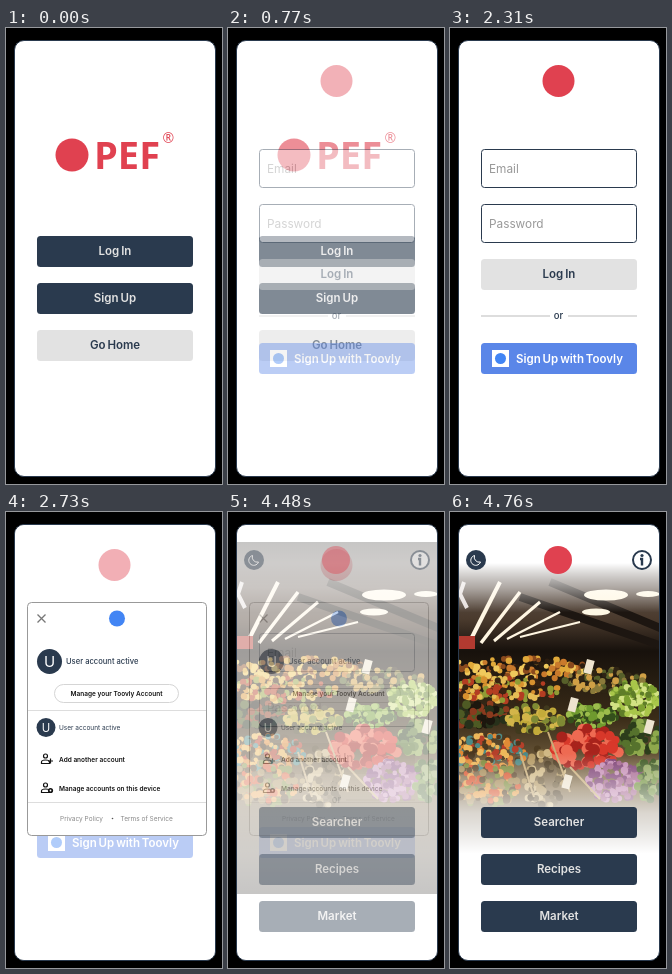
Recreate the animation shown at these times as an HTML page. Size 216 by 456 pixels, loop 6.09 s.

```html
<!DOCTYPE html>
<html lang="en">
<head>
<meta charset="utf-8">
<title>App login flow</title>
<style>
  html, body { margin: 0; width: 100%; height: 100%; overflow: hidden; background: #000; }
  svg { display: block; width: 216px; height: 456px; font-family: Inter, sans-serif; }
  /* Screens dissolve element by element; the dialog fades as a whole. */
  #welcome > * { opacity: var(--welcome); }
  #login > * { opacity: var(--login); }
  #home > * { opacity: var(--home); }
  #dialog { opacity: var(--dialog); }
  .label { font-size: 11.5px; font-weight: 600; word-spacing: -1px; }
  .hint { font-size: 11.8px; fill: #999; }
  .small { font-size: 6.5px; }
  .bold { font-weight: 600; fill: #111; }
  .mid { text-anchor: middle; }
</style>
</head>
<body>
<svg viewBox="0 0 216 456">
  <defs>
    <clipPath id="card"><rect x="9" y="13" width="200" height="435" rx="9"/></clipPath>
    <clipPath id="frame"><rect x="9" y="30" width="200" height="352"/></clipPath>
    <linearGradient id="depth" x1="0" y1="0" x2="0" y2="1">
      <stop offset="0" stop-color="#17130f"/>
      <stop offset=".13" stop-color="#5d5046"/>
      <stop offset=".22" stop-color="#4a3a2d"/>
      <stop offset=".31" stop-color="#17110c"/>
      <stop offset=".5" stop-color="#3a2c18"/>
      <stop offset=".7" stop-color="#8a7450"/>
      <stop offset="1" stop-color="#17130f"/>
    </linearGradient>
    <linearGradient id="haze" x1="0" y1="0" x2="0" y2="1">
      <stop offset=".06" stop-color="#fff"/>
      <stop offset=".2" stop-color="#fff" stop-opacity="0"/>
      <stop offset=".6" stop-color="#fff" stop-opacity="0"/>
      <stop offset=".77" stop-color="#fff" stop-opacity=".75"/>
      <stop offset=".885" stop-color="#fff"/>
    </linearGradient>
    <filter id="soft"><feGaussianBlur stdDeviation=".6"/></filter>
  </defs>
  <rect x="8.5" y="12.5" width="201" height="436" rx="9.5" fill="#fff" stroke="#2a3a4e"/>
  <g clip-path="url(#card)">
    <g id="welcome"></g>
    <g id="login"></g>
    <g id="dialog"></g>
    <g id="home"></g>
  </g>
</svg>
<script>
const NAVY = '#2a3a4e', RED = '#e04150', BLUE = '#4285f4', GREY = '#e2e2e2';
const LOOP = 6090, STEP = 70, STEPS = 6;
const $ = id => document.getElementById(id);

const circle = (x, y, r, fill) => `<circle cx="${x}" cy="${y}" r="${r}" fill="${fill}"/>`;
const text = (x, y, str, cls, fill = NAVY) =>
  `<text x="${x}" y="${y}" class="${cls}" fill="${fill}">${str}</text>`;
const button = (y, label, fill = NAVY, color = GREY) =>
  `<g><rect x="31" y="${y}" width="156" height="31" rx="3.5" fill="${fill}"/>${text(109, y + 19, label, 'label mid', color)}</g>`;
const field = (y, label) =>
  `<g><rect x="31.5" y="${y}" width="155" height="38" rx="3" fill="#fff" stroke="${NAVY}"/>${text(39, y + 23, label, 'hint')}</g>`;
const line = (d, color, width = 1) =>
  `<path d="${d}" fill="none" stroke="${color}" stroke-width="${width}"/>`;
const avatar = (x, y, r) =>
  circle(x, y, r, NAVY) + `<text x="${x}" y="${y + r * .43}" class="mid" font-size="${r * 1.2}" fill="#fff">U</text>`;
const person = y => line(`M35.5 ${y + 4.5}v-1.5q0-2 4-2t4 2v1.5zM37.5 ${y - 3}a2 2 0 1 0 4 0a2 2 0 1 0-4 0`, '#111', 1.2);

// Market stall: heaps of small round shapes in soft focus.
let seed = 11;
const random = () => (seed = seed * 16807 % 2147483647) / 2147483647;
function heap([x, y, w, h, colors, count, size]) {
  const list = colors.split(' ');
  let out = '';
  for (let i = 0; i < count; i++) {
    const angle = random() * 2 * Math.PI, d = Math.sqrt(random());
    out += circle((x + w * d * Math.cos(angle)).toFixed(1), (y + h * d * Math.sin(angle)).toFixed(1),
      (size * (.7 + .5 * random())).toFixed(1), list[i % list.length]);
  }
  return out;
}
const heaps = [
  [65, 157, 75, 11, '#e0a93a #f0c95c #8a4a1e #2a1c10 #c97a2c', 130, 3],
  [55, 178, 55, 12, '#d8922f #3a2412 #e6bd55 #8f9b35 #b33d22', 130, 3],
  [155, 168, 40, 12, '#8a7a3a #2e2414 #d0a046 #57602a', 90, 3],
  [30, 203, 30, 12, '#1c170e #4e5a24 #27301a #8a3a1e', 70, 4],
  [85, 207, 28, 14, '#d3b54a #7f8a34 #40391d #c3ab3a', 80, 3.5],
  [38, 240, 40, 18, '#e08a35 #4d8a86 #b5402a #4a3820 #edb85a', 140, 3],
  [35, 272, 35, 22, '#d8532b #a58a55 #7d8a3a #e8a04a #5a4428', 130, 3.5],
  [95, 265, 24, 30, '#b59a64 #6d5a38 #d0b884 #4e3d22', 80, 3.5],
  [142, 203, 24, 12, '#6f9a2f #35501c #9cbc4c', 80, 3],
  [185, 187, 24, 18, '#a9c64a #7da030 #d2e283 #5f7d28', 140, 3],
  [190, 226, 22, 16, '#56722d #8ea84c #2c3d1b', 70, 4],
  [137, 236, 33, 20, '#d8382a #a8231c #ee6a52', 80, 5],
  [165, 269, 27, 20, '#a5658f #7d4174 #c48cb4', 120, 3.2],
  [200, 266, 14, 22, '#6f8f3a #3f5a24 #93a860', 60, 3.5]
];
const lamp = (x, y, w) => `<ellipse cx="${x}" cy="${y}" rx="${w}" ry="${w / 4}" fill="#fff8e4"/>`;
const tag = (x, y) =>
  `<rect x="${x}" y="${y}" width="8" height="14" fill="#eee4cf" transform="rotate(15 ${x} ${y})"/>`;
// Strip lights and ceiling beams fan out from the far end of the hall.
const beams = [0, 1, 2, 3, 4].map(i =>
  line(`M${18 + i * 13} ${133 - i * 2}L${50 + i * 20} ${70 + i * 10}`, '#fff6e2', 4 - i * .5)).join('');
const photo = `<g clip-path="url(#frame)"><g filter="url(#soft)">
  <rect x="0" y="30" width="216" height="352" fill="url(#depth)"/>
  ${line('M100 70L215 118M70 85L215 135', '#1d1611', 8)}${line('M14 70L10 82L17 96', '#e6dfdc', 4)}
  ${beams}<rect x="9" y="124" width="16" height="13" fill="#b33a30"/>
  ${heaps.map(heap).join('')}
  ${lamp(156, 83, 22)}${lamp(146, 100, 14)}${lamp(198, 82, 12)}
  ${line('M98 220l22 60M120 255l30 32M70 240l14 45', '#c9ad78', 2)}
  ${tag(137, 147)}${tag(121, 185)}${tag(197, 207)}${tag(115, 262)}
</g></g>`;

$('welcome').innerHTML = circle(66, 127, 16.5, RED)
  + `<text x="88" y="141" font-family="Open Sans, sans-serif" font-weight="700" font-size="38" fill="${RED}">PEF</text>`
  + `<text x="156.5" y="114.5" font-family="Open Sans, sans-serif" font-size="14" fill="${RED}">®</text>`
  + button(208, 'Log In') + button(255, 'Sign Up') + button(302, 'Go Home', GREY, NAVY);

$('login').innerHTML = circle(108.5, 53, 16, RED)
  + field(121.5, 'Email') + field(176.5, 'Password') + button(231, 'Log In', GREY, NAVY)
  + line('M31 288H100M118 288H187', '#ddd', 2)
  + `<text x="108.5" y="291" class="mid" font-size="9.5" font-weight="500" fill="${NAVY}">or</text>`
  + `<g>${button(315, '', '#5a86e8')}<rect x="42" y="322" width="17" height="17" fill="#fff"/>`
  + circle(50.5, 330.5, 5.5, BLUE) + text(66, 335, 'Sign Up with Toovly', 'label', '#fff') + '</g>';

$('dialog').innerHTML = `<rect width="216" height="456" fill="#fff" opacity=".58"/>
  <rect x="21.5" y="90.5" width="179" height="233" rx="4" fill="#fff" stroke="#999"/>`
  + line('M31.5 102.5l8 8m0-8l-8 8', '#777', 1.3) + circle(111, 106.5, 8, BLUE)
  + avatar(43.5, 149.5, 12.5)
  + `<text x="60" y="152" font-size="7.6" font-weight="500" fill="${NAVY}">User account active</text>`
  + '<rect x="48.5" y="172.5" width="124" height="18" rx="9" fill="none" stroke="#d5d5d5"/>'
  + text(110.5, 184, 'Manage your Toovly Account', 'small bold mid')
  + line('M22 198.5H200M22 290.5H200', '#ddd')
  + avatar(40, 215.5, 9.5) + text(53, 218, 'User account active', 'small')
  + person(247) + line('M44.5 246.5v5m-2.5-2.5h5', '#111', 1.2) + text(53, 249.5, 'Add another account', 'small bold')
  + person(276) + circle(44.5, 278.5, 2.6, '#111') + circle(44.5, 278.5, .9, '#fff')
  + text(53, 278.5, 'Manage accounts on this device', 'small bold')
  + text(54, 309, 'Privacy Policy', 'small', '#888') + circle(106.5, 306.5, .8, '#555')
  + text(114.5, 309, 'Terms of Service', 'small', '#888');

$('home').innerHTML = photo
  + '<rect x="9" y="30" width="200" height="352" fill="url(#haze)"/>'
  + circle(108, 48, 14, RED)
  + `<g>${circle(26, 48, 10, NAVY)}${line('M24.5 43.5a5 5 0 1 0 6 6.5a5 5 0 0 1-6-6.5z', '#fff')}</g>`
  + `<g><circle cx="192" cy="48" r="9" fill="#fff" stroke="${NAVY}" stroke-width="2"/>`
  + circle(192, 43.5, 1.6, NAVY) + line('M190 47h2v6.5', NAVY, 2.4) + '</g>'
  + button(295, 'Searcher') + button(342, 'Recipes') + button(389, 'Market');

// Eased progress of a dissolve, advancing in even steps.
function dissolve(time, start) {
  const step = Math.floor((time - start) / STEP);
  const x = Math.min(Math.max(step, 0), STEPS) / STEPS;
  return Math.sin(Math.PI / 2 * x ** 1.2);
}

function draw() {
  const time = performance.now() % LOOP;
  const login = dissolve(time, 630), dialog = dissolve(time, 2310), home = dissolve(time, 4340);
  const opacity = { welcome: 1 - login, login: login * (1 - home), dialog: dialog * (1 - home), home };
  for (const id in opacity) $(id).style.setProperty('--' + id, opacity[id]);
  requestAnimationFrame(draw);
}
draw();
</script>
</body>
</html>
```
